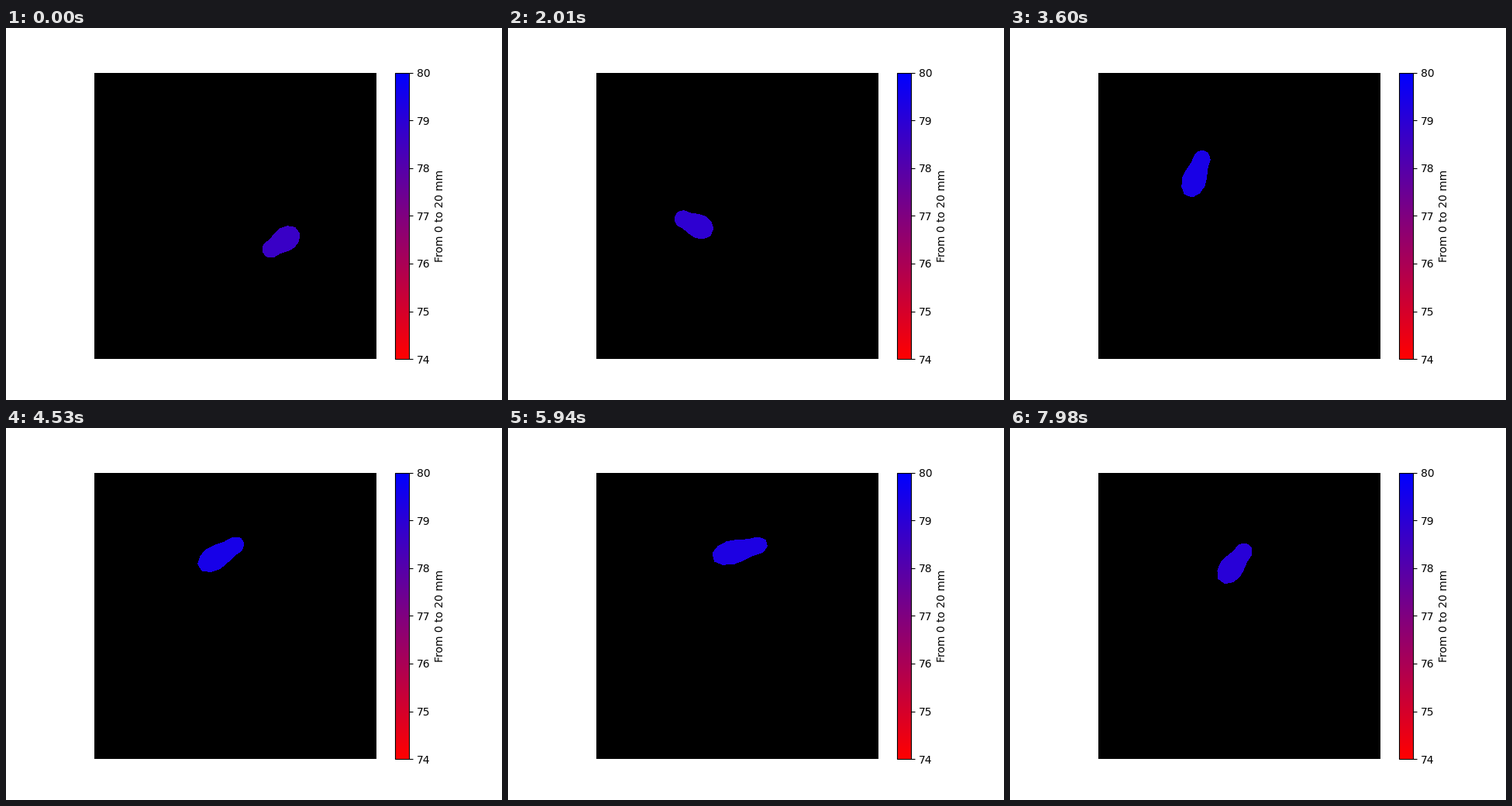
Animation of 640x480 px, one loop 8000 ms. Source, as a matplotlib script:

```python
import numpy as np
import matplotlib.pyplot as plt
from matplotlib.animation import FuncAnimation
from matplotlib.cm import ScalarMappable
from matplotlib.colors import LinearSegmentedColormap, Normalize
from matplotlib.patches import Polygon, Rectangle

W, H, DPI = 640, 480, 100
FRAMES, STEP = 250, 32
HALF_WIDTH = 15

# Key poses of the body: ms, centre x, centre y, heading in degrees, half length.
POSES = np.array([
    (0, 356, 276, 145, 26.5),
    (825, 316, 285, 172, 28),
    (1110, 307, 279, 197, 28.5),
    (2010, 240, 253, 205, 26),
    (2445, 236, 250, 213, 27),
    (3255, 237, 208, 270, 30),
    (3600, 240.5, 188.5, 290, 31),
    (4530, 277, 163, 328, 33),
    (5940, 298.5, 158, 345, 36),
    (6500, 313, 160, 340, 34),
    (7305, 303, 178, 297, 29),
    (7980, 290, 175, 307, 29.5),
])
TIMES, STATES = POSES[:, 0], POSES[:, 1:]
SLOPES = np.gradient(STATES, TIMES, axis=0)

# One side of the body from head to tail, in half lengths and half widths.
SIDE = np.array([(1, 0.25), (0.88, 0.52), (0.75, 0.68), (0.4, 0.72),
                 (0, 0.92), (-0.35, 1), (-0.7, 0.8), (-0.95, 0.35)])
BODY = np.vstack([SIDE, SIDE[::-1] * (1, -1)])


def pose(t):
    """Centre, heading and half length at time t, by cubic Hermite curves."""
    i = int(np.clip(np.searchsorted(TIMES, t, "right") - 1, 0, len(TIMES) - 2))
    span = TIMES[i + 1] - TIMES[i]
    s = min((t - TIMES[i]) / span, 1)
    blend = STATES[i] + (STATES[i + 1] - STATES[i]) * s * s * (3 - 2 * s)
    bend = SLOPES[i] * (1 - s) - SLOPES[i + 1] * s
    return blend + span * s * (1 - s) * bend


def outline(t):
    x, y, heading, length = pose(t)
    c, s = np.cos(np.radians(heading)), np.sin(np.radians(heading))
    return BODY * (length, HALF_WIDTH) @ np.array([[c, s], [-s, c]]) + (x, y)


def depth(t):
    """Rises while the body moves up the stage, then sinks slowly."""
    return np.interp(t, [1100, 3600, 4800, 7980], [78.65, 79.4, 79.45, 79.05])


fig = plt.figure(figsize=(W / DPI, H / DPI), dpi=DPI, facecolor="white")
stage = fig.add_axes([0, 0, 1, 1])
stage.set(xlim=(0, W), ylim=(H, 0))
stage.axis("off")
stage.add_patch(Rectangle((114, 58), 364, 369, fc="black", lw=0,
                          antialiased=False))
blob = stage.add_patch(Polygon(outline(0), closed=True, lw=0,
                               antialiased=False))

scale = ScalarMappable(Normalize(74, 80),
                       LinearSegmentedColormap.from_list("depth", ["red", "blue"]))
cax = fig.add_axes([501.6 / W, 0.11, 18.48 / W, 0.77])
fig.colorbar(scale, cax=cax, label="From 0 to 20 mm", ticks=range(74, 81))


def update(frame):
    t = (frame + 0.5) * STEP
    blob.set_xy(outline(t))
    blob.set_facecolor(scale.to_rgba(depth(t)))
    return [blob]


anim = FuncAnimation(fig, update, frames=FRAMES, interval=STEP,
                     init_func=lambda: update(0), repeat=True, repeat_delay=0)
plt.show()
```
